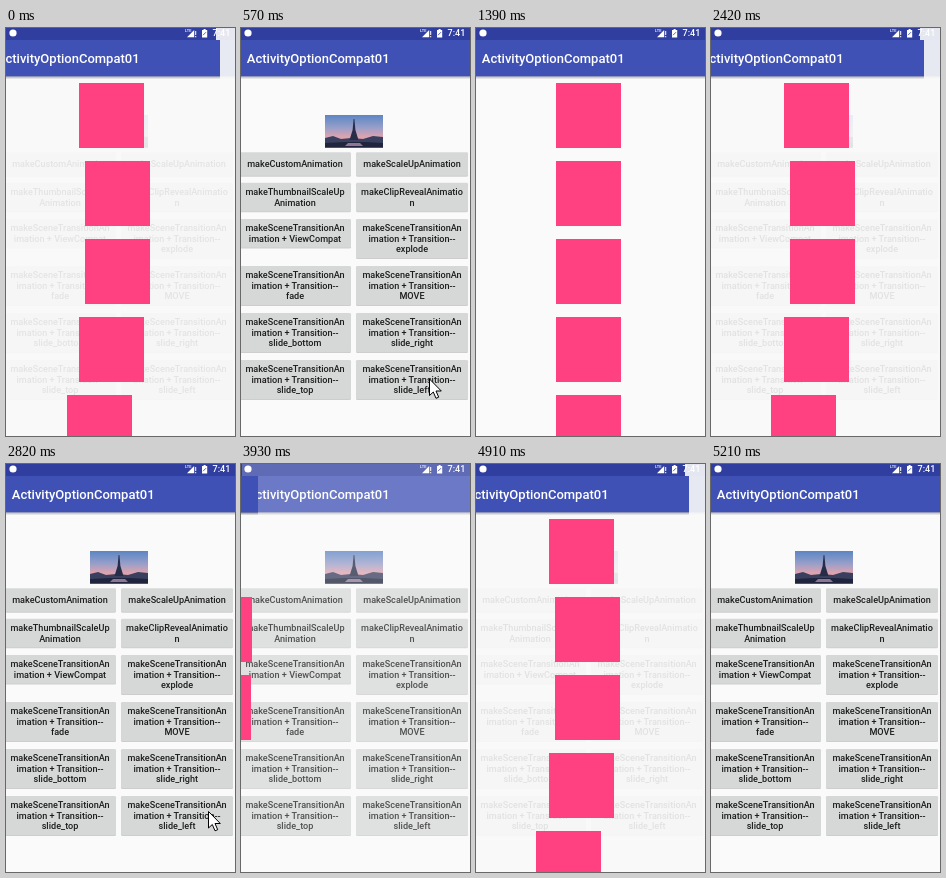
An HTML page that plays this animation: 229 by 408 pixels, repeating every 5.46 s.

```html
<!DOCTYPE html>
<html lang="en">
<head>
<meta charset="utf-8">
<title>Slide transition demo</title>
<style>
  html, body { margin: 0; width: 100%; height: 100%; overflow: hidden; background: #fafafa; }
  svg { display: block; width: 229px; height: 408px; }
  text { font-family: Roboto, "Noto Sans", sans-serif; font-weight: 500; }
  .title { font-size: 13px; fill: #fff; }
  .label { font-size: 9.1px; fill: #000; fill-opacity: .87; text-anchor: middle; }
  .clock { font-size: 9px; fill: #fff; }
  .net { font-size: 4px; fill: #fff; }
</style>
</head>
<body>
<svg id="stage" viewBox="0 0 229 408">
  <defs>
    <linearGradient id="shade" x1="0" y1="0" x2="0" y2="1">
      <stop offset="0" stop-color="#000" stop-opacity=".28"/>
      <stop offset="1" stop-color="#000" stop-opacity="0"/>
    </linearGradient>
    <linearGradient id="sky" x1="0" y1="0" x2="0" y2="1">
      <stop offset="0" stop-color="#5b86c4"/>
      <stop offset=".4" stop-color="#9a9fc9"/>
      <stop offset=".68" stop-color="#e0a3ae"/>
      <stop offset="1" stop-color="#c08a9c"/>
    </linearGradient>
  </defs>
  <rect width="229" height="408" fill="#fafafa"/>
  <g id="main"></g>
  <rect id="veil" width="229" height="408" fill="#fafafa"/>
  <g id="detail"></g>
  <g id="status" fill="#fff">
    <circle cx="7" cy="5" r="3.6"/>
    <text class="net" x="179" y="4">LTE</text>
    <path d="M181 9.2L188.2 2V9.2z"/>
    <path d="M189.2 3h1v4h-1zM189.2 8h1v1.2h-1z"/>
    <path d="M196 2h1.6V1h2V2h1.6V9.4H196z"/>
    <path d="M197 7.2l3-3" stroke="#303f9f" stroke-width=".8"/>
    <text class="clock" x="206.6" y="8.2">7:41</text>
  </g>
  <path id="cursor" d="M0 0V16.5L3.8 13L6.5 19.3L9.2 18.2L6.5 12H11.8z"
        fill="#fff" stroke="#000" stroke-width="1" stroke-linejoin="round"/>
</svg>
<script>
const NS = "http://www.w3.org/2000/svg";
const LOOP = 5460, WIDTH = 229, DURATION = 300;
const byId = id => document.getElementById(id);
const clamp = v => Math.min(1, Math.max(0, v));

function add(parent, tag, attrs = {}, text = "") {
  const el = document.createElementNS(NS, tag);
  for (const key in attrs) el.setAttribute(key, attrs[key]);
  el.textContent = text;
  parent.append(el);
  return el;
}

function statusBar(parent) {
  return add(parent, "rect", { width: WIDTH, height: 12, fill: "#303f9f" });
}

function toolbar(parent) {
  const g = add(parent, "g");
  add(g, "rect", { y: 12, width: WIDTH, height: 36.4, fill: "#3f51b5" });
  add(g, "rect", { y: 48.4, width: WIDTH, height: 3, fill: "url(#shade)" });
  add(g, "text", { class: "title", x: 5.8, y: 35 }, "ActivityOptionCompat01");
  return g;
}

function photo(parent) {
  const g = add(parent, "g", { transform: "translate(84 87)" });
  add(g, "rect", { width: 58, height: 32.5, fill: "url(#sky)" });
  add(g, "path", { d: "M0 23L8 21L16 24L26 23L38 24L48 21L58 22V32.5H0z", fill: "#39405f" });
  add(g, "path", { d: "M28.6 4H29.4L30.4 15L33.5 25H24.5L27.6 15z", fill: "#272c48" });
  add(g, "path", { d: "M0 28L20 27H40L58 28V32.5H0z", fill: "#20243c" });
  add(g, "path", { d: "M23 28H35L38 31H20z", fill: "#8d7794" });
}

// Lines of one button, split by "|"; returns the parts that change when pressed.
function button(parent, x, cy, label) {
  const lines = label.split("|"), n = lines.length;
  const h = [23.4, 28.5, 39.2][n - 1];
  const box = { x, y: cy - h / 2, width: 112, height: h, rx: 1.4 };
  const shadow = add(parent, "rect", { ...box, y: box.y + 1, fill: "#000", "fill-opacity": .18 });
  const face = add(parent, "rect", { ...box, fill: "#d6d7d7" });
  lines.forEach((line, i) => add(parent, "text",
    { class: "label", x: x + 56, y: cy + 3.2 + (i - (n - 1) / 2) * 10.66 }, line));
  return { shadow, face, y: box.y };
}

const main = byId("main"), detail = byId("detail");
statusBar(main);
toolbar(main);
photo(main);

const scene = kind => "makeSceneTransitionAn|imation + " + kind;
const step = kind => scene("Transition--|" + kind);
const LEFT = -2, RIGHT = 115;
[
  [LEFT, 136, "makeCustomAnimation"],
  [RIGHT, 136, "makeScaleUpAnimation"],
  [LEFT, 169, "makeThumbnailScaleUp|Animation"],
  [RIGHT, 169, "makeClipRevealAnimatio|n"],
  [LEFT, 205.3, scene("ViewCompat")],
  [RIGHT, 210.5, step("explode")],
  [LEFT, 257.5, step("fade")],
  [RIGHT, 257.5, step("MOVE")],
  [LEFT, 304.5, step("slide_bottom")],
  [RIGHT, 304.5, step("slide_right")],
  [LEFT, 351.5, step("slide_top")]
].forEach(b => button(main, ...b));
const target = button(main, RIGHT, 351.5, step("slide_left"));

// Sliding views, each with the vertical distance of its centre from mid-screen.
const views = [0, 1, 2, 3, 4].map(i => ({
  el: add(detail, "rect", { x: 80, y: 55 + 78 * i, width: 65, height: 65, fill: "#ff4081" }),
  dist: Math.abs(87.5 + 78 * i - 204)
}));
views.push({ el: toolbar(detail), dist: 174 }, { el: statusBar(detail), dist: 198 });

const ticks = [0, 150, 300, 420, 570, 850, 1000, 1120, 1270, 1390, 2420, 2540, 2690, 2820,
  3530, 3660, 3810, 3930, 4080, 4200, 4350, 4910, 5060, 5210];
const slides = [[-17, false], [930, true], [2400, false], [3860, true], [4890, false]];
const pointer = [[420, 570, 214, 351], [570, 1000, 188.5, 351], [2820, 3810, 202.5, 347.5]];
const presses = [[850, 1000], [3530, 3810]];
const during = t => ([from, to]) => t >= from && t < to;

// Entering views decelerate, centre first; leaving views accelerate, edges first.
function shift(t, [at, enter], dist) {
  const lag = (dist - 39) / WIDTH * 100;
  const p = clamp((t - at + (enter ? -lag : lag)) / DURATION);
  return -Math.round(WIDTH * (enter ? (1 - p) ** 2 : p * p));
}

function draw(time) {
  const t = ticks.findLast(v => v <= time);
  const slide = slides.findLast(([at]) => at <= t);
  const [at, enter] = slide;

  for (const v of views) v.el.setAttribute("transform", `translate(${shift(t, slide, v.dist)} 0)`);
  byId("veil").setAttribute("opacity",
    enter ? clamp((t - at) / DURATION) : 1 - clamp((t - at + 12) / DURATION));

  const pressed = presses.some(during(t));
  target.face.setAttribute("fill", pressed ? "#c9caca" : "#d6d7d7");
  target.shadow.setAttribute("y", target.y + (pressed ? 2.2 : 1));

  const spot = pointer.find(during(t)), cursor = byId("cursor");
  cursor.setAttribute("visibility", spot ? "visible" : "hidden");
  if (spot) cursor.setAttribute("transform", `translate(${spot[2]} ${spot[3]})`);
}

const start = performance.now();
function frame() {
  draw((performance.now() - start) % LOOP);
  requestAnimationFrame(frame);
}
frame();
</script>
</body>
</html>
```
